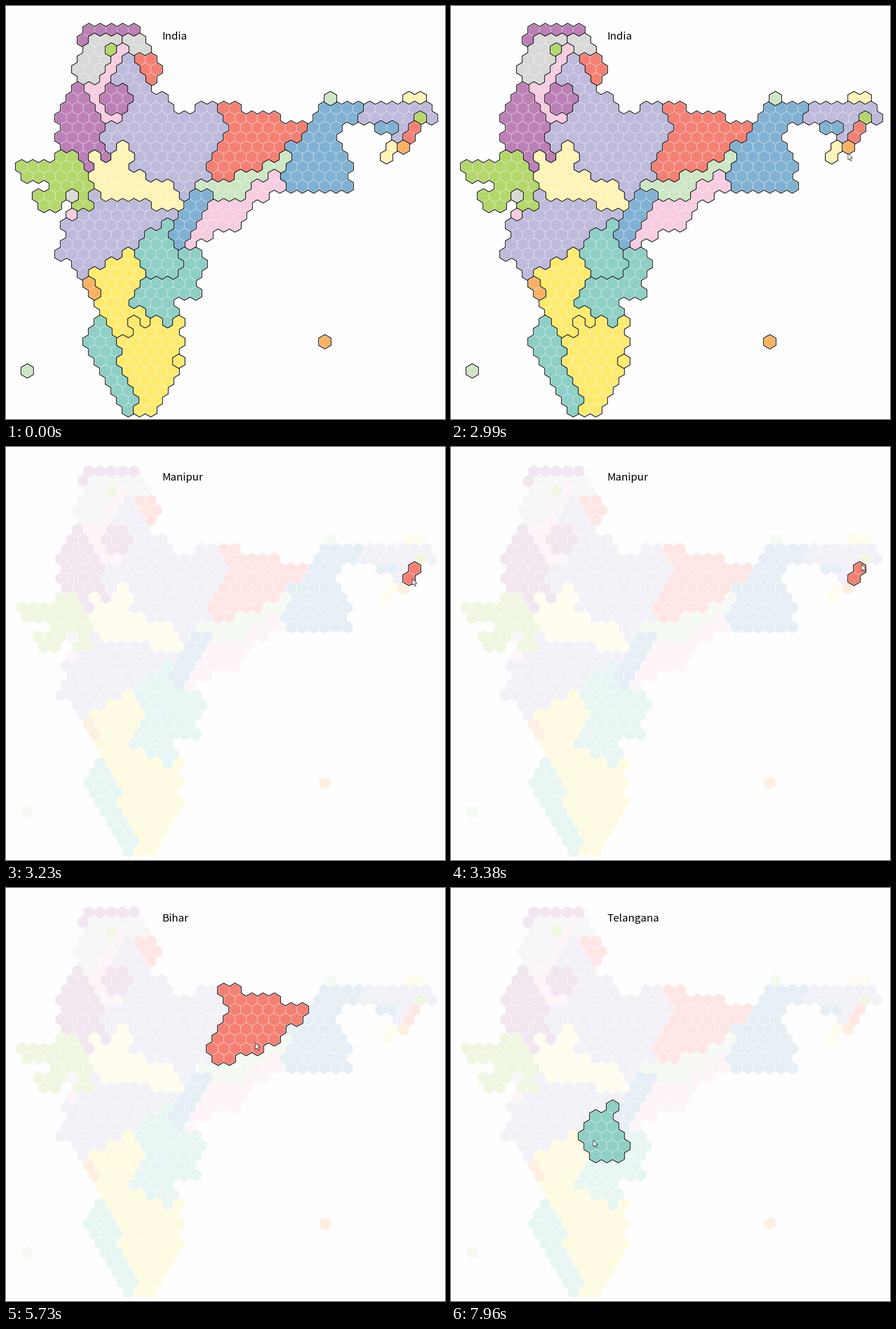
These frames come from a looping animation (772x726 px, 8 s). A matplotlib script:

```python
import numpy as np
import matplotlib.pyplot as plt
from matplotlib.animation import FuncAnimation
from matplotlib.collections import PolyCollection
from matplotlib.colors import to_rgb
from matplotlib.patches import Polygon

W, H, DPI = 772, 726, 100
PX = 72 / DPI                      # one pixel in points
LOOP, STEP = 8000, 40
BG = "#fefefe"

SIDE = 11.4
PITCH, ROW_H = SIDE * 3 ** 0.5, SIDE * 1.5
X0, Y0 = 27.5, 43

TEAL, CREAM, LILAC, RED = "#8ed0c5", "#fdf4b6", "#bebadb", "#f48073"
BLUE, ORANGE, GREEN, PINK = "#80b1d3", "#fbb162", "#b4d76b", "#f8cce1"
GREY, PURPLE, MINT, YELLOW = "#d9d9d8", "#bc80b7", "#cde7c5", "#feeb6e"

# name: (colour, first row, column runs of each following row)
STATES = {
    "Jammu and Kashmir": (PURPLE, 0, "6-10 5"),
    "Punjab": (GREY, 1, "6-8 6-7 5-7 5-7 5-6"),
    "Himachal Pradesh": (GREY, 1, "9-10 10-11"),
    "Chandigarh": (GREEN, 2, "8"),
    "Haryana": (PINK, 2, "9 8 8 7 6-7 6 7 7-8"),
    "Delhi": (PURPLE, 6, "8-9 7-9 8-9"),
    "Uttarakhand": (RED, 3, "10-11 11-12 11"),
    "Rajasthan": (PURPLE, 6, "5 4-5 4-6 3-6 4-7 3-6 4-7 5,7 6"),
    "Uttar Pradesh": (LILAC, 3, "9 9-10 8-10 10-11 10-12 10-13,16-17 9-17 "
                      "8-18 7-17 8,10-17 10-16 10-16 11-16 14-15 14"),
    "Bihar": (RED, 8, "18-19 18-22 19-25 18-24 18-23 17-22 17-21 17-18"),
    "West Bengal": (BLUE, 8, "27-30 26-29 26-28 25-27 24-28 24-28 24-29 "
                    "23-28 24-29"),
    "Sikkim": (MINT, 7, "27"),
    "Arunachal Pradesh": (CREAM, 7, "34-35"),
    "Assam": (LILAC, 8, "31-36 30-34,36 34 33"),
    "Nagaland": (GREEN, 9, "35"),
    "Meghalaya": (BLUE, 10, "32-33"),
    "Manipur": (RED, 10, "35 34"),
    "Tripura": (CREAM, 12, "33 32"),
    "Mizoram": (ORANGE, 12, "34"),
    "Gujarat": (GREEN, 13, "3-4 0-5 0-5 3-6 1-3,5 2-3,5-6"),
    "Daman and Diu": (GREY, 17, "4"),
    "Dadra and Nagar Haveli": (PINK, 19, "4"),
    "Madhya Pradesh": (CREAM, 12, "9 6,8-9 7-9 6-10 7-13 7-13 12-14"),
    "Maharashtra": (LILAC, 17, "6 7-11 5-13 4-12 4-10 4-10 3-8 5-7 5"),
    "Jharkhand": (MINT, 13, "23 22-23 19-21 16-20 17-19"),
    "Orissa": (PINK, 15, "22 21-23 20-21 17-20 16-19 16-19 15-16 15"),
    "Chhattisgarh": (BLUE, 17, "15-16 15-16 14-15 14-15 13-14 14"),
    "Telangana": (TEAL, 20, "13 11-12 11-13 10-13 11-14 11-13"),
    "Andhra Pradesh": (TEAL, 23, "14-15 15-16 14-15 11-15 10-15 10-13 "
                       "11-13 13"),
    "Karnataka": (YELLOW, 23, "9 8-10 6-10 7-10 7-9 7-9 7-10 8-9,11 8-9"),
    "Goa": (ORANGE, 26, "6 6"),
    "Kerala": (TEAL, 30, "7 6-7 6-8 6-8 7-8 7-8 8-9 8-9 9-10 9"),
    "Tamil Nadu": (YELLOW, 30, "10,12,14 10-13 9-14 9-13 9-13 9-13 10-13 "
                   "10-12 11-12 10-11"),
    "Puducherry": (YELLOW, 34, "14"),
    "Andaman and Nicobar": (ORANGE, 32, "27"),
    "Lakshadweep": (MINT, 35, "0"),
}

# hover label and the time it takes over, in ms
HOVERS = [(0, "India"), (3060, "Mizoram"), (3220, "Manipur"),
          (3450, "Nagaland"), (3600, "Assam"), (4230, "West Bengal"),
          (4880, "Bihar"), (5980, "Jharkhand"), (6330, "Orissa"),
          (7120, "Chhattisgarh"), (7860, "Telangana")]

# pointer tip: time, x, y
POINTER = np.array([
    (510, 592, 685), (780, 530, 621), (1220, 530, 621), (1540, 620, 526),
    (1890, 620, 526), (2560, 699, 265), (2960, 699, 265), (2990, 698, 259),
    (3150, 711, 244), (3390, 722, 206), (3740, 722, 180), (3830, 722, 180),
    (4590, 545, 212), (4690, 545, 212), (4810, 522, 210), (5010, 475, 222),
    (5380, 475, 222), (6140, 400, 325), (6250, 400, 325), (6420, 387, 353),
    (6540, 376, 362), (6880, 376, 362), (7310, 322, 378), (7730, 322, 378),
    (7960, 250, 443)])
ARROW = np.array([(0, 0), (0, 11.6), (2.7, 9.2), (4.6, 13.4), (6.4, 12.6),
                  (4.7, 8.6), (8.2, 8.4)])

ANGLES = np.radians(np.arange(30, 390, 60))
HEX = SIDE * np.column_stack([np.cos(ANGLES), np.sin(ANGLES)])


def fade(color, amount):
    """Mix a colour with white; amount 1 keeps it unchanged."""
    return tuple(1 - amount * (1 - v) for v in to_rgb(color))


def cells(first_row, spec):
    """Hexagon corners of every cell in a state."""
    out = []
    for row, runs in enumerate(spec.split(), first_row):
        for run in runs.split(","):
            ends = [int(v) for v in run.split("-")]
            for col in range(ends[0], ends[-1] + 1):
                center = (X0 + PITCH * (col + row % 2 / 2), Y0 + ROW_H * row)
                out.append(HEX + center)
    return out


def layer(names, opacity=1, outlined=True):
    """One collection with the cells of the named states."""
    polys, faces, edges, widths = [], [], [], []

    def add(shapes, face, edge, width):
        n = len(shapes)
        polys.extend(shapes)
        faces.extend([face] * n)
        edges.extend([edge] * n)
        widths.extend([width * PX] * n)

    for name in names:
        color, row, spec = STATES[name]
        shapes = cells(row, spec)
        if outlined:
            add(shapes, "black", "black", 3.3)
        add(shapes, fade(color, opacity), fade(color, 0.4 * opacity), 0.9)
    group = PolyCollection(polys, facecolors=faces, edgecolors=edges,
                           linewidths=widths, joinstyle="miter")
    ax.add_collection(group, autolim=False)
    return group


fig = plt.figure(figsize=(W / DPI, H / DPI), dpi=DPI, facecolor=BG)
ax = fig.add_axes([0, 0, 1, 1])
ax.set_xlim(0, W)
ax.set_ylim(H, 0)
ax.axis("off")

pale = layer(STATES, opacity=0.2, outlined=False)
views = {"India": layer(STATES)}
for _, name in HOVERS[1:]:
    views[name] = layer([name])

label = ax.text(274.5, 59.3, "", fontsize=18.6 * PX, color="black",
                family="Noto Sans CJK JP", va="baseline")
pointer = Polygon(ARROW, closed=True, facecolor="white", edgecolor="#333333",
                  linewidth=0.9 * PX, zorder=5)
ax.add_patch(pointer)


def update(i):
    t = i * STEP + 30
    current = [name for start, name in HOVERS if start <= t][-1]
    for name, view in views.items():
        view.set_visible(name == current)
    pale.set_visible(current != "India")
    label.set_text(current)

    times, xs, ys = POINTER.T
    pointer.set_visible(t >= times[0])
    pointer.set_xy(ARROW + (np.interp(t, times, xs), np.interp(t, times, ys)))
    return [pale, *views.values(), label, pointer]


anim = FuncAnimation(fig, update, frames=LOOP // STEP, interval=STEP,
                     repeat=True, repeat_delay=0, blit=False)
plt.show()
```
